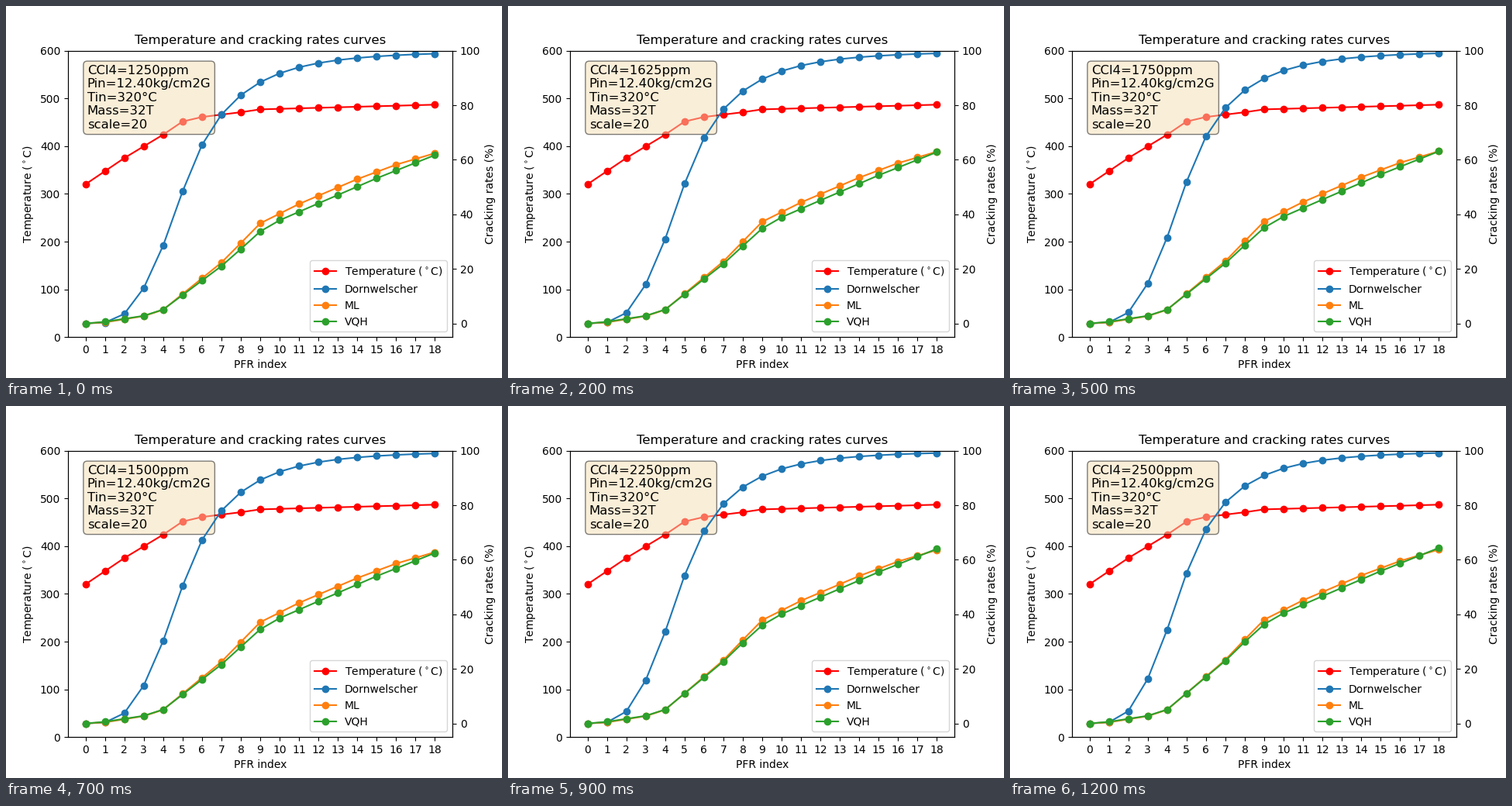
A matplotlib script that plays this animation: 640x480 px, repeating every 1300 ms.

```python
import matplotlib.pyplot as plt
import numpy as np
from matplotlib.animation import FuncAnimation

# CCl4 dose of each run in ppm, in playing order
DOSES = [1250, 1000, 1625, 1375, 1125, 1750, 1875,
         1500, 2000, 2250, 2125, 2375, 2500]
LARGE = 11.87  # point size of title and note
index = np.arange(19)


def bend(*points):
    """Straight segments through a few (index, value) points."""
    return np.interp(index, *zip(*points))


temperature = bend((0, 320), (2, 375), (4, 424), (5, 451.5), (6, 461),
                   (8, 471), (9, 477), (18, 486.8))
ml_base = bend((0, 0), (1, 0.4), (3, 2.7), (4, 5), (7, 22.6), (9, 37.1),
               (11, 44.2), (14, 53.3), (16, 58.6), (18, 62.8))
vqh_base = bend((0, 0), (1, 0.6), (3, 2.8), (4, 5.1), (7, 21.6), (9, 34.5),
                (10, 38.6), (12, 44.8), (15, 54), (18, 62.5))


def effect(dose):
    """Dose response: 0 at 1500 ppm, 1 at 2500 ppm."""
    return (1 - np.sqrt(1500 / dose)) / (1 - np.sqrt(1500 / 2500))


def logistic(dose):
    x = np.log(np.maximum(index, 0.01) / 5)
    steep = 3.55 + 0.4 * np.exp(-8 * x**2)
    return 100 / (1 + np.exp(-steep * x - 0.015 - 0.19 * effect(dose)))


def lifted(base, gain):
    ramp = np.clip((index - 4) / 4, 0, 1)
    return lambda dose: base + gain * effect(dose) * ramp


MODELS = {
    "Dornwelscher": logistic,
    "ML": lifted(ml_base, 0.95),
    "VQH": lifted(vqh_base, 1.85),
}


def caption(dose):
    return (f"CCl4={dose}ppm\nPin=12.40kg/cm2G\nTin=320°C\n"
            "Mass=32T\nscale=20")


fig, ax = plt.subplots(figsize=(6.4, 4.8), dpi=100)
ax.set_title("Temperature and cracking rates curves", fontsize=LARGE)
temp_line, = ax.plot(index, temperature, "o-", color="red",
                     label=r"Temperature ($^\circ$C)")
ax.set_xticks(index)
ax.set_xlabel("PFR index")
ax.set_ylabel(r"Temperature ($^\circ$C)")
ax.set_ylim(0, 600)
note = ax.text(0.05, 0.95, caption(DOSES[0]), transform=ax.transAxes,
               fontsize=LARGE, va="top",
               bbox=dict(boxstyle="round", facecolor="wheat", alpha=0.5))

rate_ax = ax.twinx()
rate_ax.set_ylabel("Cracking rates (%)")
rate_ax.set_ylim(-5, 100)
lines = [rate_ax.plot(index, rate(DOSES[0]), "o-", label=name)[0]
         for name, rate in MODELS.items()]
rate_ax.legend(handles=[temp_line, *lines], loc="lower right")


def update(i):
    dose = DOSES[i]
    note.set_text(caption(dose))
    for line, rate in zip(lines, MODELS.values()):
        line.set_ydata(rate(dose))
    return [note, *lines]


anim = FuncAnimation(fig, update, frames=len(DOSES), interval=100,
                     repeat=True, repeat_delay=0)
plt.show()
```
